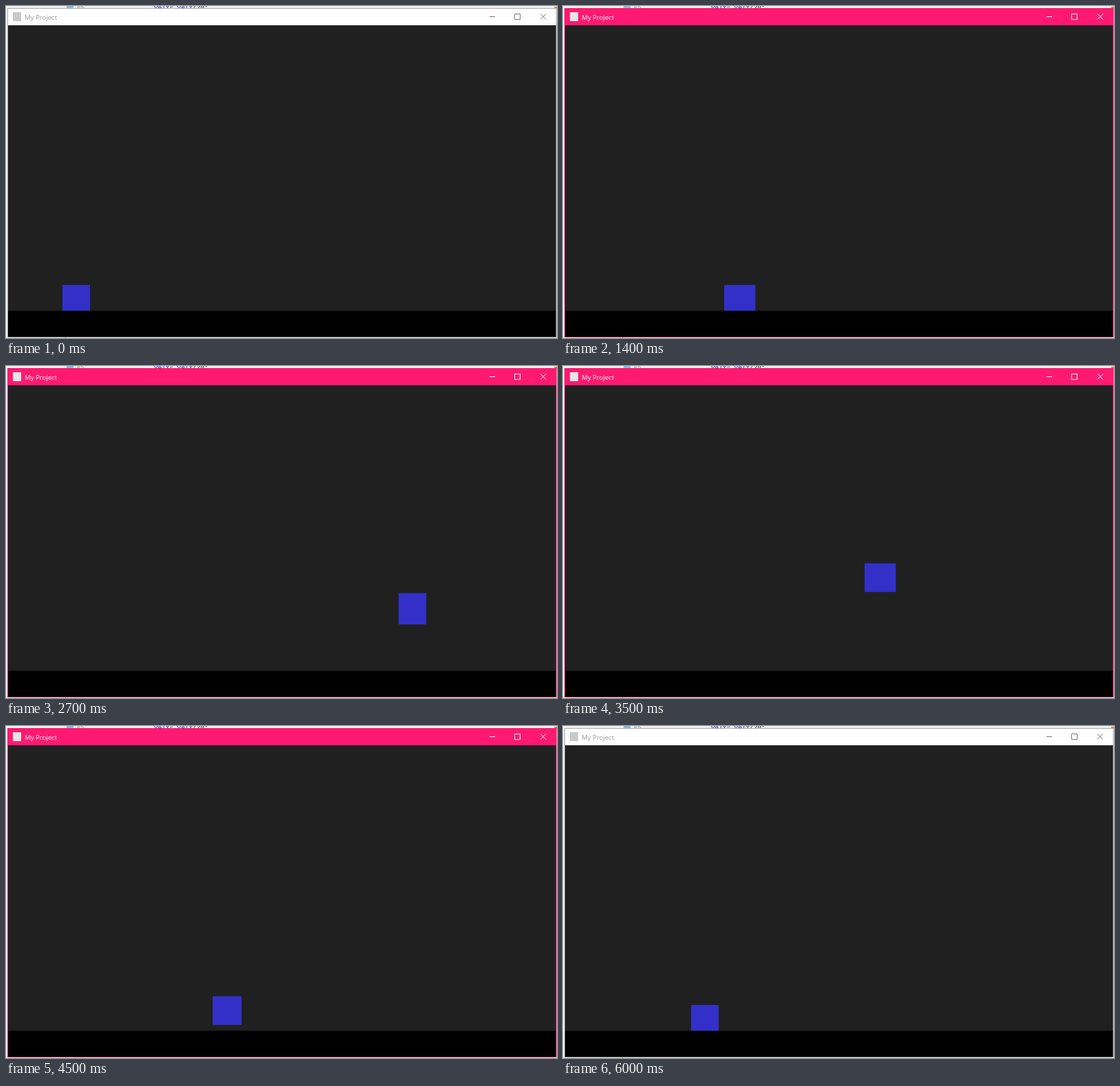
Write an HTML page with a canvas that moves like this. It is 800x482 px and loops after 6.1 s.

```html
<!DOCTYPE html>
<html lang="en">
<meta charset="utf-8">
<title>My Project</title>
<style>
  html, body { margin: 0; width: 100%; height: 100%; overflow: hidden; }
  canvas { display: block; }
</style>
<canvas id="stage" width="800" height="482"></canvas>
<script>
const ctx = document.getElementById('stage').getContext('2d');
const LOOP = 6100, STEP = 100;

// Horizontal path: time in ms, left edge, speed in px per step
const path = [
  [700, 82, 0], [1400, 234, 41], [2100, 519, 41], [2450, 572, 0],
  [2700, 570, -2], [2800, 565, -8], [3500, 438, -41], [4200, 329, -2],
  [4500, 300, -16], [4900, 225, -18], [5400, 192, -2], [5600, 188, -1],
  [6000, 186, 0]
];
const landings = [2895, 4256, 5563];
const GROUND = 405, PEAK = 160, RISE = 5.9, FALL = 5.1;

function rect(color, x, y, w, h) {
  ctx.fillStyle = color;
  ctx.fillRect(x, y, w, h);
}

function text(str, x, y, color, font) {
  ctx.font = font;
  ctx.fillStyle = color;
  ctx.fillText(str, x, y);
}

// Cubic Hermite interpolation, returns position and speed
function horizontal(t) {
  if (t <= path[0][0]) return { x: path[0][1], v: 0 };
  const i = path.findIndex(key => key[0] >= t);
  const [t0, x0, v0] = path[i - 1], [t1, x1, v1] = path[i];
  const n = (t1 - t0) / STEP, u = (t - t0) / (t1 - t0), d = x1 - x0;
  const b = 3 * d - n * (2 * v0 + v1), c = n * (v0 + v1) - 2 * d;
  return {
    x: x0 + u * (n * v0 + u * (b + u * c)),
    v: v0 + u * (2 * b + 3 * u * c) / n
  };
}

// Drop below the peak: constant acceleration up to a top speed
function drop(n, gravity, top) {
  const ramp = top / gravity;
  return n < ramp ? gravity * n * n / 2 : top * (n - ramp / 2);
}

function vertical(t) {
  for (const landing of landings) {
    const n = (t - landing) / STEP + FALL;
    if (n <= -RISE || n >= FALL) continue;
    const rising = n < 0, m = Math.abs(n);
    const gravity = rising ? 13.7 : 18.9, top = rising ? 34.5 : 41;
    const speed = Math.min(gravity * m, top);
    const height = Math.max(0, PEAK - drop(m, gravity, top));
    return { y: GROUND - height, stretch: speed * (rising ? 0.05 : 0.133) };
  }
  return { y: GROUND, stretch: 0 };
}

function drawBackdrop() {
  rect('#f0f1f3', 0, 0, 800, 482);
  rect('#8cb8dc', 88, 0, 10, 4);
  const mono = '9.33px "Liberation Mono", monospace';
  text('65', 103, 5, '#888', mono);
  text('velY= velY', 215, 5, '#1a1a9c', mono);
  text('/20;', 271, 5, '#222', mono);
  rect('#d08a58', 796, 1, 4, 3);
  rect('#888', 86, 480, 1, 2);
}

function drawWindow(active) {
  const ink = active ? '#fff' : '#777';
  rect(active ? '#ff1970' : '#aaa', 2, 3, 797.5, 478);
  rect(active ? '#ff1970' : '#fff', 3, 4, 795.5, 24);
  rect(active ? '#e4e6e4' : '#c6cacc', 10, 9, 12, 13);
  text('My Project', 27, 19.5, active ? '#fff' : '#999',
    '9.6px "Open Sans", "Noto Sans", sans-serif');

  ctx.strokeStyle = ink;
  ctx.lineWidth = 1;
  ctx.beginPath();
  ctx.moveTo(702, 15.5); ctx.lineTo(710, 15.5);
  ctx.rect(738.5, 11.5, 8, 8);
  ctx.moveTo(776, 11.5); ctx.lineTo(784, 19.5);
  ctx.moveTo(784, 11.5); ctx.lineTo(776, 19.5);
  ctx.stroke();

  rect('#202020', 3, 28, 795.5, 415);
}

function draw(t) {
  drawBackdrop();
  drawWindow(t >= 400 && t < 5900);
  const { x, v } = horizontal(t), { y, stretch } = vertical(t);
  rect('#3230c8', x, y, 40 + Math.abs(v) * 0.13, 40 + stretch);
  rect('#000', 3, 442.5, 795.5, 38);
}

function tick() {
  const t = performance.now() % LOOP;
  draw(Math.floor(t / STEP) * STEP);
  requestAnimationFrame(tick);
}
tick();
</script>
</html>
```
